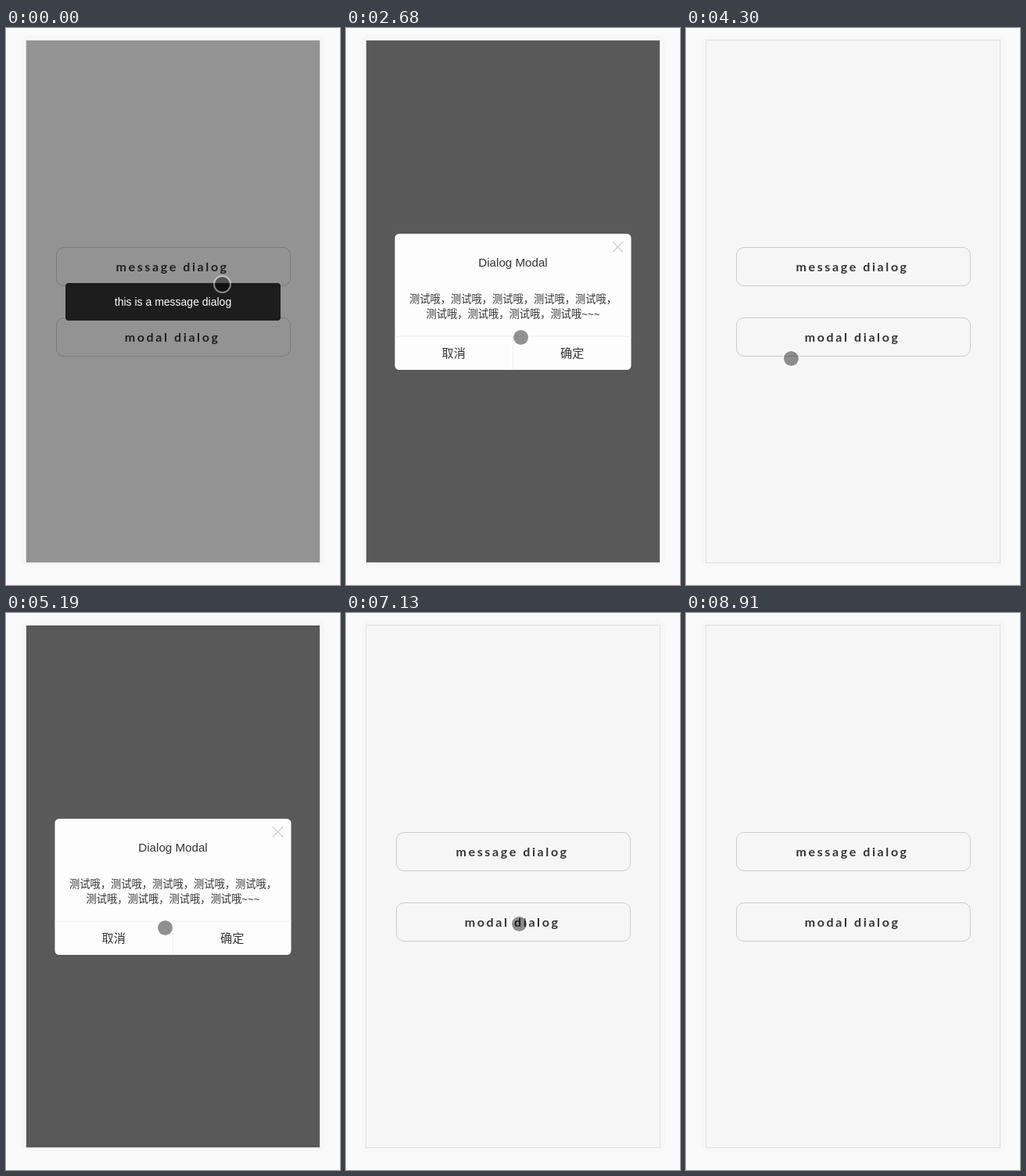
An HTML page that plays this animation: 427x712 px, repeating every 9.73 s.

```html
<!DOCTYPE html>
<html lang="zh-CN">
<head>
<meta charset="utf-8">
<title>Dialogs</title>
<style>
  html, body { margin: 0; width: 100%; height: 100%; overflow: hidden; background: #fafafa; }
  svg { display: block; width: 100%; height: 100%; }
  text { font-family: "Liberation Sans", "Noto Sans CJK SC", "Noto Sans CJK", sans-serif; fill: #333; }
  .mid { text-anchor: middle; }
  .label { font: 700 16px Lato, sans-serif; letter-spacing: 2.6px; }
  .button { fill: #f6f6f6; stroke: #ccc; }
  .line { stroke: #eee; fill: none; }
</style>
</head>
<body>
<svg viewBox="0 0 427 712">
  <rect width="427" height="712" fill="#fafafa"/>
  <rect x="19" y="9" width="389" height="681" rx="10" fill="#f7f7f7"/>
  <rect x="25.5" y="15.5" width="376" height="668" fill="#f6f6f6" stroke="#e1e1e1"/>

  <rect class="button" x="64.5" y="280.5" width="299" height="49" rx="9.5"/>
  <text class="label" x="140.6" y="311">message dialog</text>
  <rect class="button" x="64.5" y="370.5" width="299" height="49" rx="9.5"/>
  <text class="label" x="151.8" y="401">modal dialog</text>

  <g id="message">
    <rect x="26" y="16" width="375" height="667" fill-opacity=".405"/>
    <rect x="76" y="326" width="275" height="48" rx="4" fill-opacity=".8"/>
    <text class="mid" x="213.5" y="355" font-size="14" style="fill:#fff">this is a message dialog</text>
  </g>

  <g id="modal">
    <rect x="26" y="16" width="375" height="667" fill="#595959"/>
    <g id="panel">
      <rect x="54" y="258" width="319" height="184" rx="6" fill="#fdfdfd"/>
      <path d="M348 269l14 14m0-14l-14 14" stroke="#d0d0d0" stroke-width="1.4"/>
      <text class="mid" x="213.5" y="302" font-size="16">Dialog Modal</text>
      <g class="mid" font-size="14">
        <text x="213.5" y="351">测试哦，测试哦，测试哦，测试哦，测试哦，</text>
        <text x="213.5" y="371">测试哦，测试哦，测试哦，测试哦~~~</text>
      </g>
      <path class="line" d="M54 396.5H373M213.5 396V442"/>
      <g class="mid" font-size="16">
        <text x="133.5" y="425.5">取消</text>
        <text x="293.5" y="425.5">确定</text>
      </g>
    </g>
  </g>

  <g id="pointer">
    <circle r="9.5" fill-opacity=".43"/>
    <circle r="10.5" fill="none" stroke="#fff" stroke-width="2" stroke-opacity=".45"/>
  </g>
</svg>
<script>
const LOOP = 9730;
const STEP = 148.5;
const MESSAGE_END = 1340;
const POINTER_END = 8910;

const modals = [
  { open: 2680, close: 4300 },
  { open: 5190, close: 6380 },
  { open: 7570, close: 8760 }
];

// Each move starts where the last one ended; sag bows the path downwards
const home = { x: 276, y: 327 };
const moves = [
  { start: 150, end: 890, x: 371, y: 322, sag: 12 },
  { start: 1490, end: 2230, x: 223, y: 395, sag: 6 },
  { start: 3120, end: 3850, x: 134, y: 422, sag: 0 },
  { start: 4600, end: 4900, x: 203, y: 402, sag: 0 },
  { start: 5490, end: 6090, x: 289, y: 422, sag: 0 },
  { start: 6680, end: 7130, x: 221, y: 397, sag: 0 },
  { start: 7870, end: 8460, x: 355, y: 275, sag: 0 }
];

const el = id => document.getElementById(id);
const message = el("message"), modal = el("modal"), panel = el("panel"), pointer = el("pointer");
const show = (node, on) => node.setAttribute("visibility", on ? "visible" : "hidden");
const mix = (a, b, u) => a + (b - a) * u;
const ease = u => u * u * (3 - 2 * u);

function progress({ start, end }, t) {
  const count = Math.round((end - start) / STEP) + 1;
  const step = Math.floor((t - start) / STEP + 0.05) + 1;
  return Math.min(step / count, 1);
}

function pointerAt(t) {
  let at = home;
  for (const move of moves) {
    if (t < move.start) break;
    const u = progress(move, t);
    at = {
      x: mix(at.x, move.x, ease(u)),
      y: mix(at.y, move.y, ease(u)) + move.sag * Math.sin(Math.PI * u)
    };
  }
  return at;
}

function draw(t) {
  show(message, t < MESSAGE_END);

  const current = modals.find(m => t >= m.open && t < m.close);
  show(modal, current);
  const scale = current && t - current.open < STEP ? 0.947 : 1;
  panel.setAttribute("transform", `translate(213.5 350) scale(${scale}) translate(-213.5 -350)`);

  show(pointer, t < POINTER_END);
  const { x, y } = pointerAt(t);
  pointer.setAttribute("transform", `translate(${x + 0.5} ${y + 0.5})`);
}

const began = performance.now();
function tick() {
  draw((performance.now() - began) % LOOP);
  requestAnimationFrame(tick);
}
tick();
</script>
</body>
</html>
```
